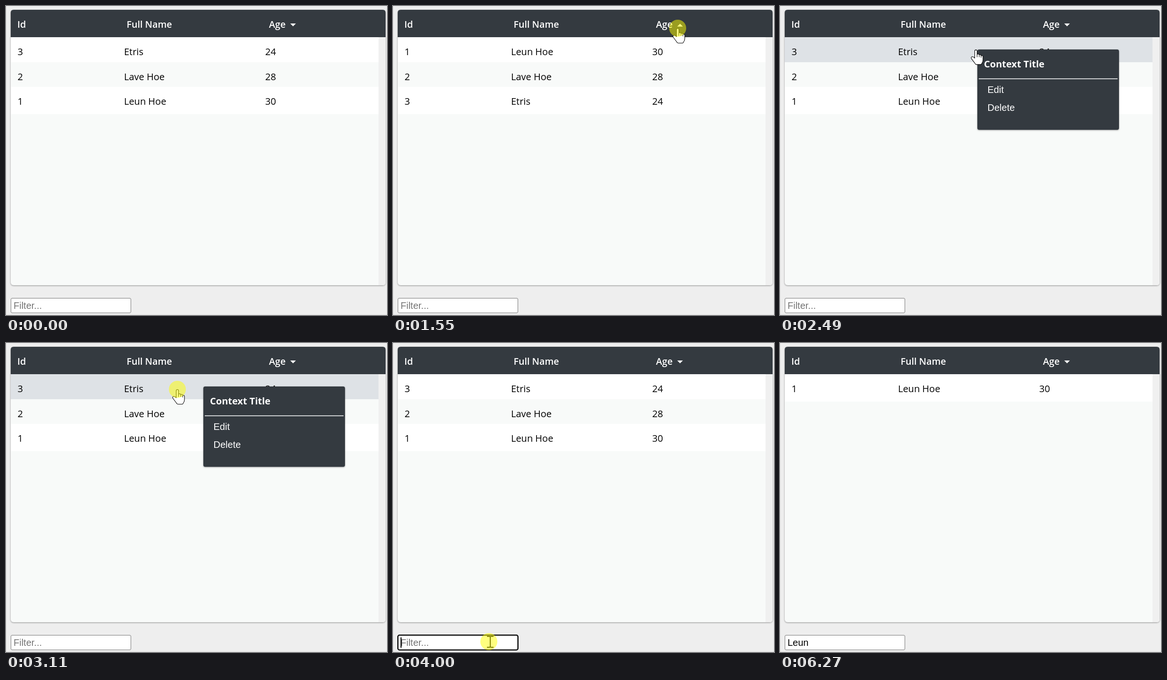
Animation, 807 px wide and 654 px high, one loop 6340 ms. Source, as an HTML page:

```html
<!DOCTYPE html>
<html lang="en">
<head>
<meta charset="utf-8">
<title>Sortable table</title>
<style>
html, body { margin: 0; width: 100%; height: 100%; overflow: hidden; background: #eee }
svg { display: block; font: 20px "Open Sans", "Noto Sans", sans-serif; white-space: pre }
.card { filter: drop-shadow(0 1.5px 1.5px rgba(0,0,0,.4)) }
.head { font-size: 19.7px; font-weight: 600; fill: #fff }
.ui { font-family: "Liberation Sans", Arial, sans-serif }
.pointer { fill: #fff; stroke: #000; stroke-width: 1.1; stroke-linejoin: round }
</style>
</head>
<body>
<svg width="807" height="654" viewBox="0 0 807 654">
  <path d="M.5 0V653.5H807" fill="none" stroke="#e4e4e4"/>
  <rect class="card" x="10" y="8" width="794" height="583" rx="6" fill="#f8faf9"/>
  <path d="M789 66H804V585Q804 591 798 591H789Z" fill="#f0f0f0"/>
  <g id="bands"></g>
  <path d="M10 66V14Q10 8 16 8H798Q804 8 804 14V66Z" fill="#343a40"/>
  <g class="head">
    <text x="24" y="46">Id</text>
    <text x="255.5" y="46">Full Name</text>
    <text x="557" y="46">Age</text>
    <path id="arrow"/>
  </g>
  <g id="rows"></g>

  <rect id="halo" x="8.5" y="616.5" width="258" height="35" rx="5" fill="#fff"/>
  <rect id="box" fill="#fff"/>
  <text id="field" class="ui" x="16" y="641"></text>
  <rect id="caret" y="623" width="2" height="22"/>

  <g id="menu" fill="#fff">
    <rect class="card" x="418" y="92" width="300" height="170" rx="4" fill="#343a40"/>
    <text x="432" y="130" font-weight="700">Context Title</text>
    <rect x="421" y="153.3" width="294" height="1.5"/>
    <g class="ui"><text x="439.5" y="184">Edit</text><text x="439.5" y="222">Delete</text></g>
  </g>

  <g id="cursor">
    <g id="hand" class="pointer">
      <path d="M-2.5 3Q-2.5 .5 0 .5T2.5 3V10Q6 8.500 7 11Q10.500 10 11 12.500Q15 12 15 15.500V22Q15 26 12.500 29Q12 31.500 10 31.500H1Q-1 31.500-2 29L-9.500 19Q-11 16-8 15Q-5.500 14.500-2.500 18Z"/>
      <path d="M2.500 10V16M7 11V16M11 12.500V17" fill="none"/>
    </g>
    <path id="plain" class="pointer" d="M0 0V23L5.300 18L9 26.500L12.500 25L9 16.700H16.500Z"/>
    <path id="beam" d="M-4-11H1Q3-11 3-9V10Q3 12 1 12H-4M10-11H5Q3-11 3-9M3 10Q3 12 5 12H10" fill="none" stroke="#000" stroke-width="2"/>
    <circle id="press" r="18" opacity=".5"/>
  </g>
</svg>
<script>
const LOOP = 6340, STEP = 69;
const $ = id => document.getElementById(id);
const set = (el, attrs) => { for (const k in attrs) el.setAttribute(k, attrs[k]); };
const show = (el, on) => el.setAttribute('visibility', on ? 'inherit' : 'hidden');
const make = (parent, tag, attrs, text = '') => {
  const el = document.createElementNS('http://www.w3.org/2000/svg', tag);
  set(el, attrs);
  el.textContent = text;
  return parent.appendChild(el);
};
const within = (t, from, to) => t >= from && t < to;

const slots = [66, 119, 171, 229];
const bands = [0, 1, 2].map(() => make($('bands'), 'rect', { x: 10, width: 779 }));
const rows = [[3, 'Etris', 24], [2, 'Lave Hoe', 28], [1, 'Leun Hoe', 30]].map(cells => {
  const g = make($('rows'), 'g', {});
  cells.forEach((text, i) => make(g, 'text', { x: [24.5, 250, 549][i], y: 38 }, text));
  return { g, name: cells[1] };
});

// from, to, start point, end point
const moves = [
  [70, 690, 749, 584, 603, 47],
  [1620, 2100, 603, 47, 418, 92],
  [2420, 2910, 418, 92, 363, 98],
  [3180, 3740, 363, 98, 203, 632],
];
// from, to, colour
const presses = [
  [760, 890, '#ff0'], [1550, 1620, '#ff0'], [2290, 2420, '#f00'],
  [3110, 3180, '#ff0'], [3810, 4140, '#ff0'],
];
const query = 'Leun', keyTimes = [4540, 4870, 4940, 5070];

function cursorAt(t) {
  const [from, to, x0, y0, x1, y1] = moves.filter(m => t >= m[0]).pop() || moves[0];
  const n = Math.round((to - from) / STEP);
  const p = Math.max(0, Math.min(1, Math.floor((t - from) / (to - from) * n + .02) / n));
  const e = p * p * (3 - 2 * p);
  return [x0 + (x1 - x0) * e, y0 + (y1 - y0) * e];
}

function drawTable(t, y, pointing, menuOpen) {
  const flipped = within(t, 890, 1620);
  const filter = query.slice(0, t >= 4940 ? 2 : t >= 4670 ? 1 : 0);
  const list = rows.filter(r => r.name.startsWith(filter));
  if (flipped) list.reverse();
  rows.forEach(r => show(r.g, list.includes(r)));
  list.forEach((r, i) => set(r.g, { transform: `translate(0 ${slots[i]})` }));

  bands.forEach((band, i) => {
    const top = slots[i], last = i === list.length - 1;
    const bottom = last ? top + 58 : slots[i + 1];
    const hover = pointing && within(y, top, bottom);
    const fill = menuOpen && i === 0 ? '#dee2e6' : hover ? '#e9ecef' : i % 2 ? '#f8faf9' : '#fff';
    set(band, { y: top, height: bottom - top, fill });
    show(band, i < list.length);
  });
  set($('arrow'), { d: flipped ? 'M602 43.5H614L608 37.5Z' : 'M602 37H614L608 43Z' });
}

function drawField(t) {
  const focus = within(t, 3810, 6270);
  const typed = query.slice(0, keyTimes.filter(k => t >= k).length);
  const field = $('field');
  field.textContent = typed || 'Filter...';
  set(field, { fill: typed ? '#000' : '#757575' });
  set($('box'), focus
    ? { x: 10.3, y: 618.3, width: 254.4, height: 31.4, rx: 3.5, stroke: '#101010', 'stroke-width': 2.6 }
    : { x: 10.5, y: 618.5, width: 254, height: 31, rx: 2.5, stroke: '#767676', 'stroke-width': 1 });
  show($('halo'), focus);
  set($('caret'), { x: Math.round(16 + (typed ? field.getComputedTextLength() - .8 : 0)) });
  show($('caret'), focus && !within(t, 5610, 6140));
}

function draw(t) {
  const [x, y] = cursorAt(t);
  const pointing = within(t, 70, 5810), menuOpen = within(t, 2420, 3180);
  drawTable(t, y, pointing, menuOpen);
  drawField(t);
  show($('menu'), menuOpen);

  const inField = x < 265 && within(y, 618, 650);
  set($('cursor'), { transform: `translate(${x} ${y})` });
  show($('cursor'), pointing);
  show($('hand'), y < 229);
  show($('beam'), inField);
  show($('plain'), y >= 229 && !inField);
  const press = presses.find(p => within(t, p[0], p[1]));
  show($('press'), press);
  if (press) set($('press'), { fill: press[2] });
}

const start = performance.now();
function frame() {
  draw((performance.now() - start) % LOOP);
  requestAnimationFrame(frame);
}
frame();
</script>
</body>
</html>
```
